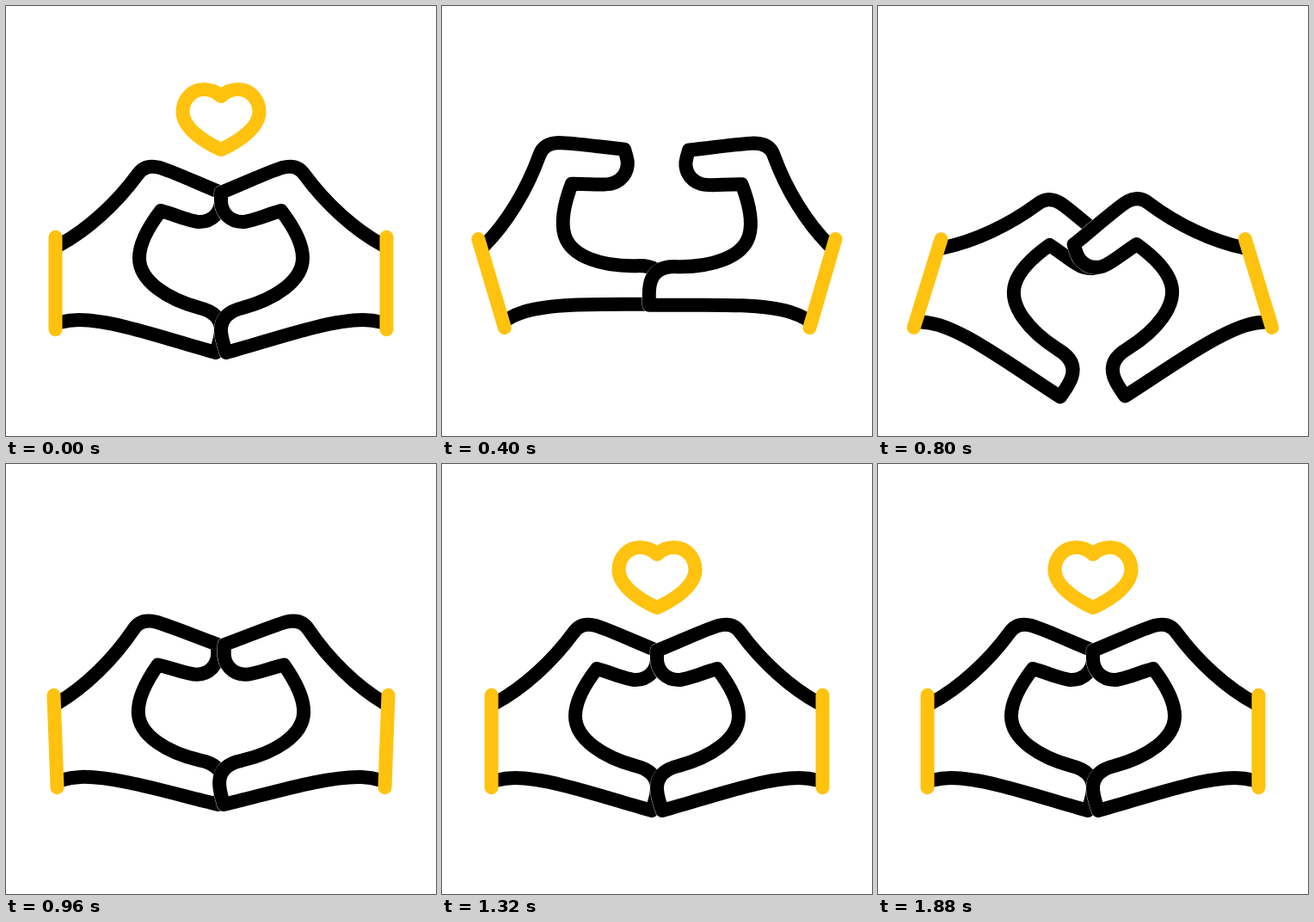
Write an HTML page that moves like this. It is 500 px wide and 500 px high and loops after 2 s.

```html
<!DOCTYPE html>
<html lang="en">
<head>
<meta charset="utf-8">
<title>Heart hands</title>
<style>
  html, body { margin: 0; width: 100%; height: 100%; overflow: hidden; background: #fff; }
  svg { display: block; width: 100vw; height: 100vh; fill: none; stroke-width: 16; stroke-linecap: round; stroke-linejoin: round; }
  .back { fill: #fff; stroke: #fff; stroke-width: 16.6; }
  .line { stroke: #000; }
  .gold { stroke: #ffc20e; }
</style>
</head>
<body>
<svg viewBox="0 0 500 500">
  <defs>
    <path id="outline" d="M438 278C405 260 372 230 347 196C341 187 332 185 321 188
      C300 195 275 207 250 217V226C250 240 260 251 275 251C285 251 302 243 320 238
      C333 255 345 275 345 293C345 320 312 341 275 351C258 355 250 364 250 377
      C250 386 253 393 256 403C310 388 375 365 415 365C424 365 430 366 438 368"/>
    <g id="hand">
      <use href="#outline" class="back"/>
      <use href="#outline" class="line"/>
      <path class="gold" d="M442.5 268.8V376.2"/>
    </g>
  </defs>
  <g transform="translate(500) scale(-1 1)"><use href="#hand" id="left"/></g>
  <use href="#hand" id="right"/>
  <path id="heart" class="gold" d="M250 105C245 100 238 97 230 97C216 97 205.5 109 205.5 123
    C205.5 140 226 156 250 167C274 156 294.5 140 294.5 123C294.5 109 284 97 270 97
    C262 97 255 100 250 105Z"/>
</svg>
<script>
  const LOOP = 2000, STEP = 40, LAST = 1880;
  const [left, right, heart] = ['left', 'right', 'heart'].map(id => document.getElementById(id));
  const start = performance.now();

  // Progress from 0 to 1 between two times, straight or eased.
  const ramp = (t, from, to) => Math.min(1, Math.max(0, (t - from) / (to - from)));
  const glide = (t, from, to) => (1 - Math.cos(Math.PI * ramp(t, from, to))) / 2;

  // Hands swing up, down, slightly up again and settle.
  const swing = t => 18 * glide(t, 0, 345) - 36 * glide(t, 345, 769)
    + 25 * glide(t, 769, 1038) - 7 * glide(t, 1038, 1306);

  // The heart flies off, then rises from between the hands and bobs once.
  const drop = t => t < LOOP / 2
    ? -54 * glide(t, 0, 345)
    : 40 - 40 * glide(t, 1070, 1314) + 17.5 * (glide(t, 1314, 1570) - glide(t, 1570, LAST));
  const opacity = t => 1 - ramp(t, 0, 345) + ramp(t, 1070, 1280);

  const turn = (hand, angle) => hand.setAttribute('transform', `rotate(${angle} 442.5 322.5)`);

  function draw() {
    const now = (performance.now() - start) % LOOP;
    const t = Math.min(LAST, Math.floor(now / STEP) * STEP);
    turn(left, swing(t));
    turn(right, swing(t) * 0.98);
    heart.setAttribute('transform', `translate(0 ${drop(t)})`);
    heart.setAttribute('opacity', opacity(t));
    requestAnimationFrame(draw);
  }
  draw();
</script>
</body>
</html>
```
